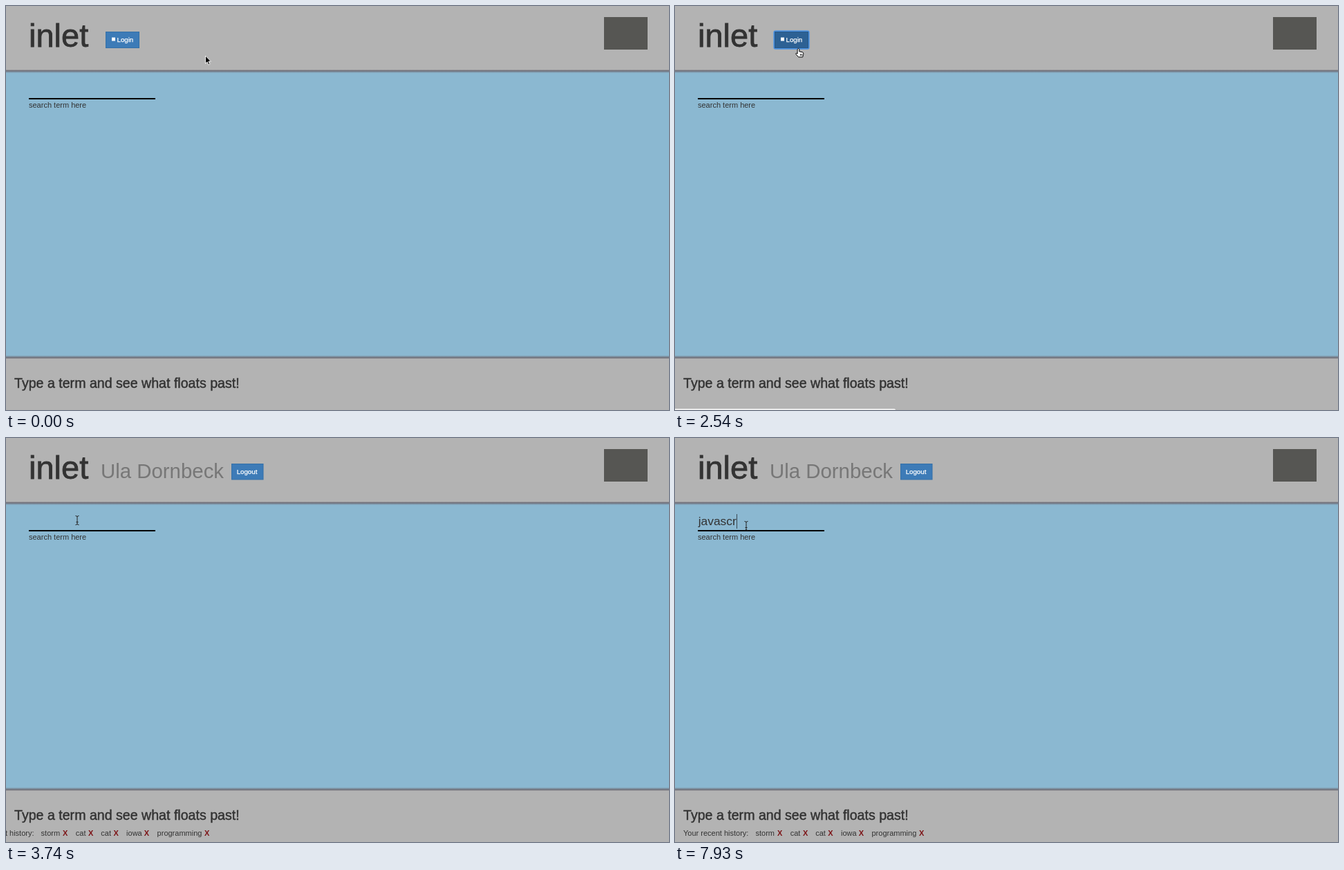
An HTML page for the animation above (7.99 s loop, 959 by 584 pixels).

```html
<!DOCTYPE html>
<html lang="en">
<head>
<meta charset="utf-8">
<title>inlet</title>
<style>
  html, body { margin: 0; width: 100%; height: 100%; overflow: hidden; background: #b3b3b3; }
  svg { display: block; font-family: "Liberation Sans", Arial, sans-serif; font-size: 11px; fill: #333; }
  .medium { stroke: #333; stroke-width: .45; }
  .button text { font-size: 9.7px; fill: #fff; stroke: #fff; stroke-width: .25; }
  .button rect { fill: #3d7bb7; stroke: #3470a8; }
  .hover rect { fill: #2d6194; stroke: #28598a; }
  .x { font-weight: bold; fill: #7d1518; }
</style>
</head>
<body>
<svg width="959" height="584" viewBox="0 0 959 584">
  <defs>
    <linearGradient id="edge" x2="0" y2="1">
      <stop offset="0" stop-color="#a5a5a7"/>
      <stop offset=".35" stop-color="#6c6c76"/>
      <stop offset=".6" stop-color="#7b8b9b"/>
      <stop offset="1" stop-color="#8bb8d1"/>
    </linearGradient>
  </defs>
  <rect width="959" height="584" fill="#b3b3b3"/>
  <rect y="95" width="959" height="412" fill="#8bb8d1"/>
  <rect y="92" width="959" height="5" fill="url(#edge)"/>
  <rect width="959" height="5" fill="url(#edge)" transform="translate(0 510) scale(1 -1)"/>
  <rect x="865" y="16" width="63" height="47" fill="#565653"/>

  <text class="medium" x="33" y="59" font-size="47" style="stroke-width:.8">inlet</text>

  <g id="login" class="button">
    <rect id="ring" x="143.5" y="36.5" width="50" height="25" rx="2" style="fill:none;stroke:#4c92e0;stroke-width:2.4"/>
    <rect x="144.5" y="37.5" width="48" height="23"/>
    <rect x="153" y="45.5" width="5" height="5" style="fill:#fff;stroke:none"/>
    <text x="160.5" y="52">Login</text>
  </g>
  <g id="user">
    <text x="137" y="58" font-size="29.4" fill="#777" style="fill:#777">Ula Dornbeck</text>
    <g class="button">
      <rect x="326.5" y="37.5" width="45.5" height="22.5"/>
      <text x="333.7" y="52">Logout</text>
    </g>
  </g>

  <text id="typed" x="33.7" y="126" font-size="17.4"></text>
  <rect id="caret" y="110" width="1" height="21" fill="#3a4a55"/>
  <rect x="33" y="133" width="183" height="2" fill="#000"/>
  <text x="33" y="147">search term here</text>

  <text class="medium" x="12" y="552" font-size="19.6">Type a term and see what floats past!</text>
  <g id="history"><text x="12" y="575">Your recent history:</text></g>
  <path id="status" d="M0 582.3H317Q319 582.3 319 584H0Z" fill="#f3f3f3"/>

  <g id="cursor">
    <path id="arrow" d="M0 0V11.2L2.6 8.8 4.4 13 6.3 12.2 4.5 8.1H8Z" fill="#000" stroke="#fff" stroke-width=".9"/>
    <path id="hand" d="M-1.4 1.2Q0-.6 1.3 1.2V4.6L5.6 5.4Q7.6 6 7.3 8.2L6.2 12.6H.2L-3.6 8.4Q-4.2 6-1.4 7.8Z M3 8V10.6M5 8V10.6" fill="#fff" stroke="#000" stroke-width="1"/>
    <path id="beam" d="M-2.5-6.5Q0-6.5 0-5Q0-6.5 2.5-6.5M0-5V5M-2.5 6.5Q0 6.5 0 5Q0 6.5 2.5 6.5M-1.5 2.5H1.5" fill="none" stroke="#222" stroke-width="1"/>
  </g>
</svg>
<script>
const LOOP = 7990;
const $ = id => document.getElementById(id);
const show = (id, on) => $(id).setAttribute('visibility', on ? 'visible' : 'hidden');
const clamp = v => Math.max(0, Math.min(1, v));

// word, word x, cross x
const terms = [['storm', 116.5, 148], ['cat', 166.7, 185], ['cat', 203.2, 221.3],
               ['iowa', 240, 265.7], ['programming', 284.5, 353]];
function addText(str, x, cls) {
  const el = document.createElementNS('http://www.w3.org/2000/svg', 'text');
  el.setAttribute('x', x);
  el.setAttribute('y', 575);
  el.setAttribute('class', cls);
  el.textContent = str;
  $('history').append(el);
}
for (const [word, x, cross] of terms) {
  addText(word, x, '');
  addText('X', cross, 'x');
}

// time, x, y of the pointer's hot spot
const path = [
  [0, 288.5, 72], [59, 288.5, 72], [60, 289.5, 79], [239, 289.5, 79], [240, 288, 82],
  [320, 270, 87], [420, 238, 80], [520, 205, 67], [610, 186, 57], [700, 178.5, 53],
  [2539, 178.5, 53], [2540, 178.5, 61], [2640, 179, 85], [2800, 177, 160], [3000, 170, 222],
  [3290, 168, 222], [3460, 166, 212], [3600, 128, 155], [3740, 103, 119],
  [3850, 103, 121], [4010, 103, 126], [4090, 103, 127], [LOOP, 103, 127]
];
function pointer(t) {
  const i = path.findIndex(p => p[0] > t);
  const [t0, x0, y0] = path[i - 1], [t1, x1, y1] = path[i];
  const k = (t - t0) / (t1 - t0);
  return [x0 + (x1 - x0) * k, y0 + (y1 - y0) * k];
}

// CSS "ease" curve, solved by bisection
function ease(x) {
  let lo = 0, hi = 1, s = .5;
  for (let i = 0; i < 24; i++) {
    s = (lo + hi) / 2;
    if (.75 * s * (1 - s) + s ** 3 < x) lo = s; else hi = s;
  }
  return .3 * s * (1 - s) ** 2 + 3 * s * s * (1 - s) + s ** 3;
}

const keys = [6890, 6980, 7160, 7330, 7510, 7630, 7930];
const blinks = [4360, 4830, 5310, 5850, 6320, 6800, 6890];
const SWAP = 3075;

function draw(t) {
  const [x, y] = pointer(t);
  const loggedIn = t >= SWAP;
  const over = !loggedIn && x > 144 && x < 193 && y > 37 && y < 62;
  const inField = x > 33 && x < 216 && y > 107 && y < 133 && loggedIn;
  $('cursor').setAttribute('transform', `translate(${x} ${y})`);
  show('hand', over);
  show('beam', inField);
  show('arrow', !over && !inField);

  $('login').setAttribute('class', over ? 'button hover' : 'button');
  $('login').style.display = loggedIn ? 'none' : '';
  $('user').style.display = loggedIn ? '' : 'none';
  $('ring').style.opacity = t < 930 ? 0 : t < 990 ? .5 : 1;
  $('status').style.opacity = t < 1290 || t >= 3380 ? 0 : t < 1400 ? .5 : 1;

  const slide = loggedIn ? ease(clamp((t - SWAP) / 980)) : 0;
  $('history').setAttribute('transform', `translate(${959 * (slide - 1)} 0)`);

  const typed = 'javascr'.slice(0, keys.filter(k => t >= k).length);
  if ($('typed').textContent !== typed) $('typed').textContent = typed;
  $('caret').setAttribute('x', typed ? 33.9 + $('typed').getComputedTextLength() : 34);
  show('caret', blinks.filter(b => t >= b).length % 2);
}

function tick() {
  draw(performance.now() % LOOP);
  requestAnimationFrame(tick);
}
tick();
</script>
</body>
</html>
```
